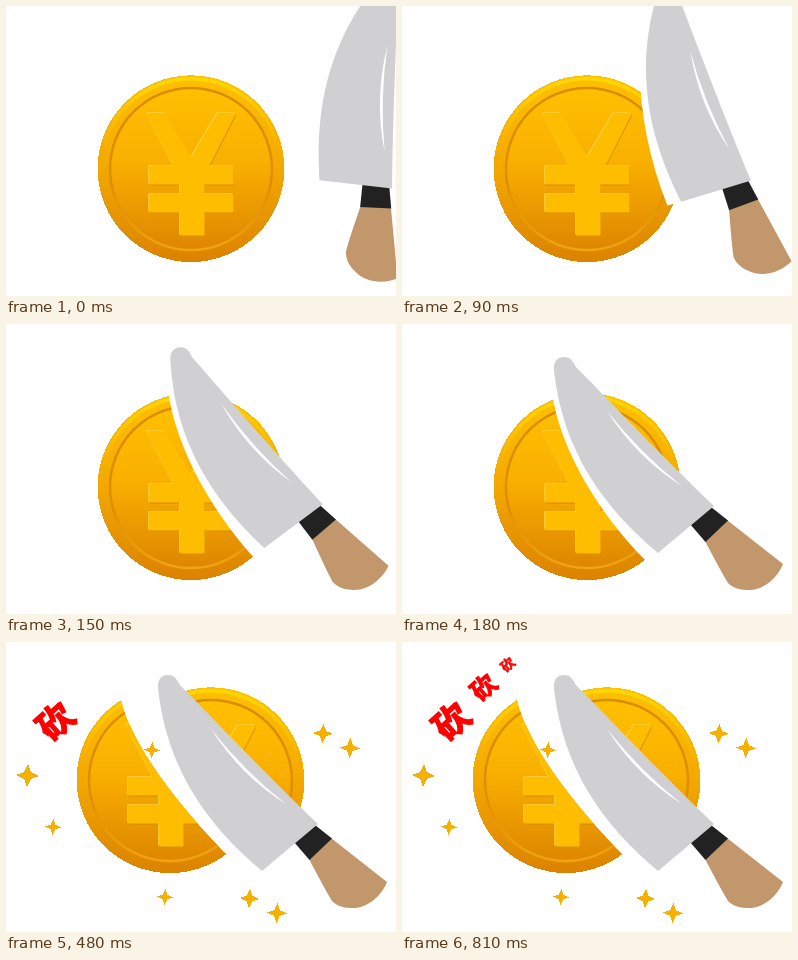
An HTML page for the animation above (1200 ms loop, 390 px wide and 290 px high).

```html
<!DOCTYPE html>
<html lang="zh">
<head>
<meta charset="utf-8">
<title>Coin chop</title>
<style>
  html, body { margin: 0; width: 100%; height: 100%; overflow: hidden; background: #fff; }
  svg { display: block; }
  text {
    font: 900 32px "Noto Sans CJK SC", "Noto Sans CJK", sans-serif;
    fill: #f00; stroke: #f00; stroke-width: 1.4; text-anchor: middle;
  }
</style>
</head>
<body>
<svg width="390" height="290" viewBox="0 0 390 290">
  <defs>
    <linearGradient id="rim" x2="0" y2="1">
      <stop stop-color="#ffc000"/><stop offset=".5" stop-color="#f3a800"/><stop offset="1" stop-color="#dc8200"/>
    </linearGradient>
    <linearGradient id="face" x2="0" y2="1">
      <stop stop-color="#ffc000"/><stop offset=".45" stop-color="#f9b000"/><stop offset="1" stop-color="#de8600"/>
    </linearGradient>
    <linearGradient id="shine" x2="0" y2="1">
      <stop stop-color="#ffd800"/><stop offset=".4" stop-color="#ffc800" stop-opacity="0"/>
    </linearGradient>
    <linearGradient id="groove" x2="0" y2="1">
      <stop stop-color="#d98c00"/><stop offset=".6" stop-color="#de8f00"/><stop offset="1" stop-color="#f0a410"/>
    </linearGradient>
    <path id="yen" stroke-width="2.4" stroke-linejoin="round" d="M142 108H158L185 153 212 108H228L201 161H226V177H197V189H226V205H197V228H175V205H144V189H175V177H144V161H169Z"/>
    <g id="coin">
      <circle cx="185" cy="162.7" r="93.4" fill="url(#rim)" shape-rendering="crispEdges"/>
      <circle cx="185" cy="162.7" r="90" fill="none" stroke="url(#shine)" stroke-width="3.5"/>
      <circle cx="185" cy="163" r="81" fill="url(#face)" stroke="url(#groove)" stroke-width="2.5"/>
      <use href="#yen" x=".8" y="1.5" fill="#dc9000" stroke="#dc9000"/>
      <use href="#yen" x="-.6" y="-.6" fill="#ffd23c" stroke="#ffd23c"/>
      <use href="#yen" x=".3" y=".3" fill="#ffbd00" stroke="#ffbd00"/>
    </g>
    <clipPath id="leftSide"><path d="M126 50 136 82C144 124 192 188 243 239L254 250V290H0V0H126Z"/></clipPath>
    <clipPath id="rightSide"><path d="M126 50 136 82C144 124 192 188 243 239L254 250V290H390V0H126Z"/></clipPath>
  </defs>

  <use id="whole" href="#coin"/>
  <g id="split">
    <use href="#coin" transform="translate(-21 -25)" clip-path="url(#leftSide)"/>
    <use href="#coin" transform="translate(20 -24)" clip-path="url(#rightSide)"/>
    <g id="stars" fill="#f8b000" shape-rendering="crispEdges"></g>
  </g>

  <g id="knife">
    <path fill="#fff" d="M152 47 150 68C157 122 194 187 245 238L256 229 200 150Z"/>
    <path fill="#c1976b" d="M325 196 381 240C376 253 362 267 345 266 336 266 330 263 326 259 318 246 310 230 303 217Z"/>
    <path fill="#222" d="M309 183 326 196.5 303.5 218 288 200Z"/>
    <path fill="#d0d0d2" d="M152 47C151 37 156 33 162 33 169 33 171 38 174 43 190 59 258 130 312 182L256 229C201 183 161 127 152 47Z"/>
    <path fill="#fff" d="M205 87Q235 134 280 162 239 130 205 87Z"/>
  </g>
  <g id="words"></g>
</svg>
<script>
  const LOOP = 1200, STEP = 30, SWING = 180, SPLIT = 210;
  const get = id => document.getElementById(id);
  const show = (node, on) => node.setAttribute("visibility", on ? "visible" : "hidden");

  // x, y, radius
  const stars = [[21.5, 133.5, 12], [47, 185, 8], [146, 108, 8], [159, 255, 8],
                 [243.5, 256.5, 10], [271, 271, 10], [317, 91.5, 10], [344, 106, 10]];
  get("stars").innerHTML = stars.map(([x, y, r]) => {
    const points = Array.from({ length: 8 }, (_, i) => {
      const reach = i % 2 ? r * 0.4 : r, angle = i * Math.PI / 4 + 0.05;
      return [x + reach * Math.cos(angle), y + reach * Math.sin(angle)];
    });
    return `<polygon points="${points.join(" ")}"/>`;
  }).join("");

  // x, y, scale, start time
  const words = [[49, 79, 1.1, 480], [81.5, 45, .78, 660], [105.5, 22.5, .43, 810]];
  get("words").innerHTML = words.map(([x, y, scale]) =>
    `<text transform="translate(${x} ${y}) rotate(-42) scale(${scale})" dy=".38em">砍</text>`).join("");
  const wordNodes = [...get("words").children];

  function draw(now) {
    const time = Math.floor(now % LOOP / STEP) * STEP;
    const swing = Math.min(time / SWING, 1);
    const angle = 46.5 * (1 + Math.cos(Math.PI * swing)) / 2;
    get("knife").setAttribute("transform", `rotate(${angle} 348.5 268.5)`);
    show(get("whole"), time < SPLIT);
    show(get("split"), time >= SPLIT);
    wordNodes.forEach((node, i) => show(node, time >= words[i][3]));
  }

  const start = performance.now();
  function tick() {
    draw(performance.now() - start);
    requestAnimationFrame(tick);
  }
  tick();
</script>
</body>
</html>
```
